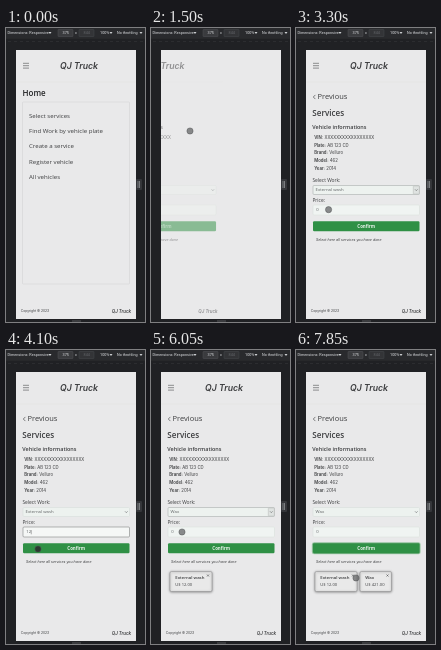
An HTML page with a canvas that plays this animation: 139 px wide and 294 px high, repeating every 8000 ms.

```html
<!DOCTYPE html>
<html lang="en">
<head>
<meta charset="utf-8">
<title>Vehicle services</title>
<style>
  html, body { margin: 0; width: 100%; height: 100%; overflow: hidden; background: #202124; }
  canvas { display: block; width: 139px; height: 294px; }
</style>
</head>
<body>
<canvas id="stage"></canvas>
<script>
const W = 139, H = 294, LOOP = 8000;
const PAGE = { x: 10, y: 22, w: 120, h: 269 };
const BRAND = 'QJ Truck';
const INK = '#3c3d3f';
const OPEN = '"Open Sans", sans-serif', INTER = 'Inter, sans-serif', ROBOTO = 'Roboto, sans-serif';
const OPTIONS = ['', 'External wash', 'Internal wash', 'Polishing', 'Wax'];
const DETAILS = [
  ['VIN:', 'X'.repeat(17)], ['Plate:', 'AB 123 CD'], ['Brand:', 'Velluro'],
  ['Model:', '462'], ['Year:', '2014']
];
const MENU = ['Select services', 'Find Work by vehicle plate', 'Create a service',
  'Register vehicle', 'All vehicles'];

// Pointer stops: time, x, y
const PATH = [
  [800, 133, 140], [1250, 39, 103], [1650, 39, 103], [2150, 56, 167], [2500, 56, 167],
  [2900, 40, 177], [3050, 40, 177], [3350, 32, 182], [3800, 32, 182], [4000, 32, 199],
  [4300, 32, 199], [4700, 40, 165], [4950, 40, 165], [5450, 26, 194], [5650, 26, 194],
  [6050, 31, 182], [6800, 31, 182], [7000, 34, 200], [7250, 34, 200], [7850, 60, 228]
];
const CLICKS = [1300, 2430, 3050, 3400, 4150, 4950, 5500, 6200, 7050];

const canvas = document.getElementById('stage');
const dpr = window.devicePixelRatio || 1;
canvas.width = Math.round(W * dpr);
canvas.height = Math.round(H * dpr);
const c = canvas.getContext('2d');
c.textBaseline = 'middle';

const clamp = v => Math.max(0, Math.min(1, v));
const easeOut = p => 1 - (1 - p) ** 2;
const easeInOut = p => p * p * (3 - 2 * p);
const between = (t, a, b) => t >= a && t < b;
const entry = (t, start) => easeOut(clamp((t - start) / 500));

function text(s, x, y, size, { font = OPEN, style = '', color = INK, align = 'left' } = {}) {
  c.font = `${style} ${size}px ${font}`;
  c.fillStyle = color;
  c.textAlign = align;
  c.fillText(s, x, y);
  return c.measureText(s).width;
}

function box(x, y, w, h, fill, stroke, r = 1, line = 0.5) {
  c.beginPath();
  c.roundRect(x, y, w, h, r);
  if (fill) { c.fillStyle = fill; c.fill(); }
  if (stroke) { c.strokeStyle = stroke; c.lineWidth = line; c.stroke(); }
}

function lines(color, width, ...segments) {
  c.strokeStyle = color;
  c.lineWidth = width;
  c.beginPath();
  for (const pts of segments) pts.forEach(([x, y], i) => i ? c.lineTo(x, y) : c.moveTo(x, y));
  c.stroke();
}

function arrow(x, y) {
  c.fillStyle = '#d0d2d5';
  c.beginPath();
  c.moveTo(x, y - 1);
  c.lineTo(x + 3, y - 1);
  c.lineTo(x + 1.5, y + 1);
  c.fill();
}

function drawToolbar() {
  c.fillStyle = '#202124';
  c.fillRect(0, 0, W, H);
  c.fillStyle = '#292a2d';
  c.fillRect(0, 0, W, 10);
  const label = { font: ROBOTO, color: '#e4e6e9' };
  text('Dimensions: Responsive', 1.5, 5, 3.8, label);
  arrow(42.5, 5);
  box(52, 1.5, 15, 7, '#3a3b3e', '#515357', 0.5);
  text('375', 56.5, 5, 3.8, label);
  text('x', 69, 5, 3.6, label);
  box(73, 1.5, 15, 7, '#333437', '#46484c', 0.5);
  text('844', 77.5, 5, 3.8, { font: ROBOTO, color: '#65676b' });
  text('100%', 94, 5, 3.8, label);
  arrow(103.5, 5);
  text('No throttling', 111, 5, 3.7, label);
  arrow(133.5, 5);
  c.fillStyle = '#2c2d30';
  c.fillRect(0, 10, W, 0.6);
  for (let x = 2; x < W; x += 6) c.fillRect(x, 13, 3, 1);
  box(130, 151, 6, 11, '#35363a');
  lines('#9a9ca0', 0.7, [[132, 153], [132, 160]], [[133.5, 153], [133.5, 160]]);
  lines('#77797d', 0.6, [[66, 293], [75, 293]]);
}

function drawFrame() {
  lines('#4b4c4e', 0.6, [[17, 35.3], [23, 35.3]], [[17, 37.7], [23, 37.7]], [[17, 40.1], [23, 40.1]]);
  text(BRAND, 73, 38.3, 8.7, { font: INTER, style: 'italic 600', align: 'center' });
  lines('#dcdcdd', 0.5, [[10, 54], [130, 54]]);
  text('Copyright © 2023', 14.8, 283.2, 3.3, { font: INTER });
  text(BRAND, 125, 283.2, 4.4, { font: INTER, style: 'italic 600', align: 'right' });
}

function drawHome() {
  drawFrame();
  text('Home', 16.5, 66, 8, { style: '600', color: '#222325' });
  box(16.5, 74, 107, 182, null, '#cecfd0', 0.5);
  MENU.forEach((item, i) => text(item, 23, 88.3 + i * 15.3, 6.1));
}

function drawCard(x, w, name, price, p) {
  if (p <= 0) return;
  const left = x - (1 - p) * w;
  c.save();
  c.globalAlpha *= p;
  c.shadowColor = 'rgba(0,0,0,.45)';
  c.shadowBlur = 2.5 * dpr;
  c.shadowOffsetY = 0.6 * dpr;
  box(left, 221.5, w, 20, '#e9e9e9', '#8c8d8f', 1.5);
  c.shadowColor = 'transparent';
  text(name, left + 5.3, 228.2, 4.3, { style: '600' });
  text(price, left + 5.3, 234.5, 4.1);
  const r = left + w - 4;
  lines('#444547', 0.6, [[r - 1, 224.5], [r + 1, 226.5]], [[r + 1, 224.5], [r - 1, 226.5]]);
  c.restore();
}

function drawSelect(value, focused) {
  box(17, 157.5, 106.5, 9, '#edf2ef', focused ? '#9da3a0' : '#d3dbd6');
  if (focused) box(117.3, 158, 6, 8, '#dfe3e1', '#b4b8b6', 0.5);
  text(value, 19.6, 162.2, 4.3, { color: '#606365' });
  lines('#636668', 0.6, [[119, 161.3], [120.3, 162.7], [121.6, 161.3]]);
}

function drawPrice(value, focused, t) {
  box(17, 177, 106.5, 10, focused ? '#f5f7f6' : '#f0f4f2', focused ? '#6a6e6c' : '#d7ded9');
  const w = text(value, 20.3, 182.2, 4.2, { color: '#606365' });
  if (focused && t % 1000 < 500) lines('#444', 0.4, [[20.5 + w, 180], [20.5 + w, 184.3]]);
}

function drawOptions(hover) {
  box(17, 167, 106.5, 32, '#f0f0f0', '#8d8f91', 0.5);
  OPTIONS.forEach((name, i) => {
    const y = 167.5 + i * 6.2;
    const on = hover >= y && hover < y + 6.2;
    if (on) { c.fillStyle = '#b9bfc4'; c.fillRect(17.3, y, 106, 6.2); }
    text(name, 20, y + 3.2, 4.2);
  });
}

function typed(t) {
  const count = (...times) => times.filter(at => t >= at).length;
  if (between(t, 3550, 4150)) return '12'.slice(0, count(3550, 3700));
  if (between(t, 6350, 7050)) return '421'.slice(0, count(6350, 6500, 6650));
  return '0';
}

function drawServices(t, pointer) {
  drawFrame();
  lines('#4b4c4e', 0.7, [[19.4, 66.9], [17.3, 69], [19.4, 71.1]]);
  text('Previous', 21.5, 69, 7.5);
  text('Services', 16.3, 86.3, 8.1, { style: '600' });
  text('Vehicle informations', 16.3, 100, 5.45, { style: '600' });
  DETAILS.forEach(([key, value], i) => {
    const y = 109.9 + i * 7.6;
    const w = text(key, 18.2, y, 4.3, { font: INTER, style: '600' });
    text(value, 19.5 + w, y, 4.3, { font: INTER });
  });

  const open = between(t, 2450, 3050) || between(t, 4950, 5500);
  const work = t < 3050 ? '' : t < 5500 ? 'External wash' : 'Wax';
  text('Select Work:', 16.4, 153, 4.9);
  drawSelect(work, between(t, 2430, 3400) || between(t, 4950, 6200));
  text('Price:', 16.4, 172.3, 4.9);
  drawPrice(typed(t), between(t, 3400, 4150) || between(t, 6200, 7050), t);

  const active = between(t, 4150, 4950) || t >= 7050;
  if (active) box(16.5, 193, 107.5, 10.5, null, '#a3cbac', 1.5, 1.4);
  box(17, 193.3, 106.5, 9.9, '#2f9045', active ? '#388b4b' : null, 1.2);
  text('Confirm', 70.2, 198.4, 4.4, { style: '700', color: '#eaf3ec', align: 'center' });
  text('Select here all services you have done', 20, 212.3, 3.6, { font: INTER, style: 'italic' });

  drawCard(64, 31.5, 'Wax', 'U$ 421.00', entry(t, 7150));
  drawCard(19, 42, 'External wash', 'U$ 12.00', entry(t, 4350));
  if (open) drawOptions(pointer ? pointer[1] : 0);
}

function pointerAt(t) {
  if (t < PATH[0][0]) return null;
  const next = PATH.findIndex(stop => stop[0] > t);
  if (next < 0) return PATH[PATH.length - 1].slice(1);
  const [t0, x0, y0] = PATH[next - 1], [t1, x1, y1] = PATH[next];
  const p = easeInOut((t - t0) / (t1 - t0));
  return [x0 + (x1 - x0) * p, y0 + (y1 - y0) * p];
}

function drawPointer([x, y], t) {
  const pressed = CLICKS.some(at => between(t, at - 50, at + 100));
  c.beginPath();
  c.arc(x, y, 3.1, 0, Math.PI * 2);
  c.fillStyle = pressed ? 'rgba(40,42,44,.85)' : 'rgba(95,97,99,.72)';
  c.fill();
  c.strokeStyle = 'rgba(80,82,84,.7)';
  c.lineWidth = 0.7;
  c.stroke();
}

function draw(t) {
  c.setTransform(dpr, 0, 0, dpr, 0, 0);
  drawToolbar();
  c.save();
  c.beginPath();
  c.rect(PAGE.x, PAGE.y, PAGE.w, PAGE.h);
  c.clip();
  c.fillStyle = '#e9e9ea';
  c.fillRect(PAGE.x, PAGE.y, PAGE.w, PAGE.h);
  const pointer = pointerAt(t);
  if (t < 1350) {
    drawHome();
  } else {
    const p = entry(t, 1350);
    c.save();
    c.globalAlpha = p;
    c.translate((p - 1) * PAGE.w, 0);
    drawServices(t, pointer);
    c.restore();
  }
  if (pointer) drawPointer(pointer, t);
  c.restore();
}

const start = performance.now();
function tick() {
  draw((performance.now() - start) % LOOP);
  requestAnimationFrame(tick);
}
tick();
</script>
</body>
</html>
```
